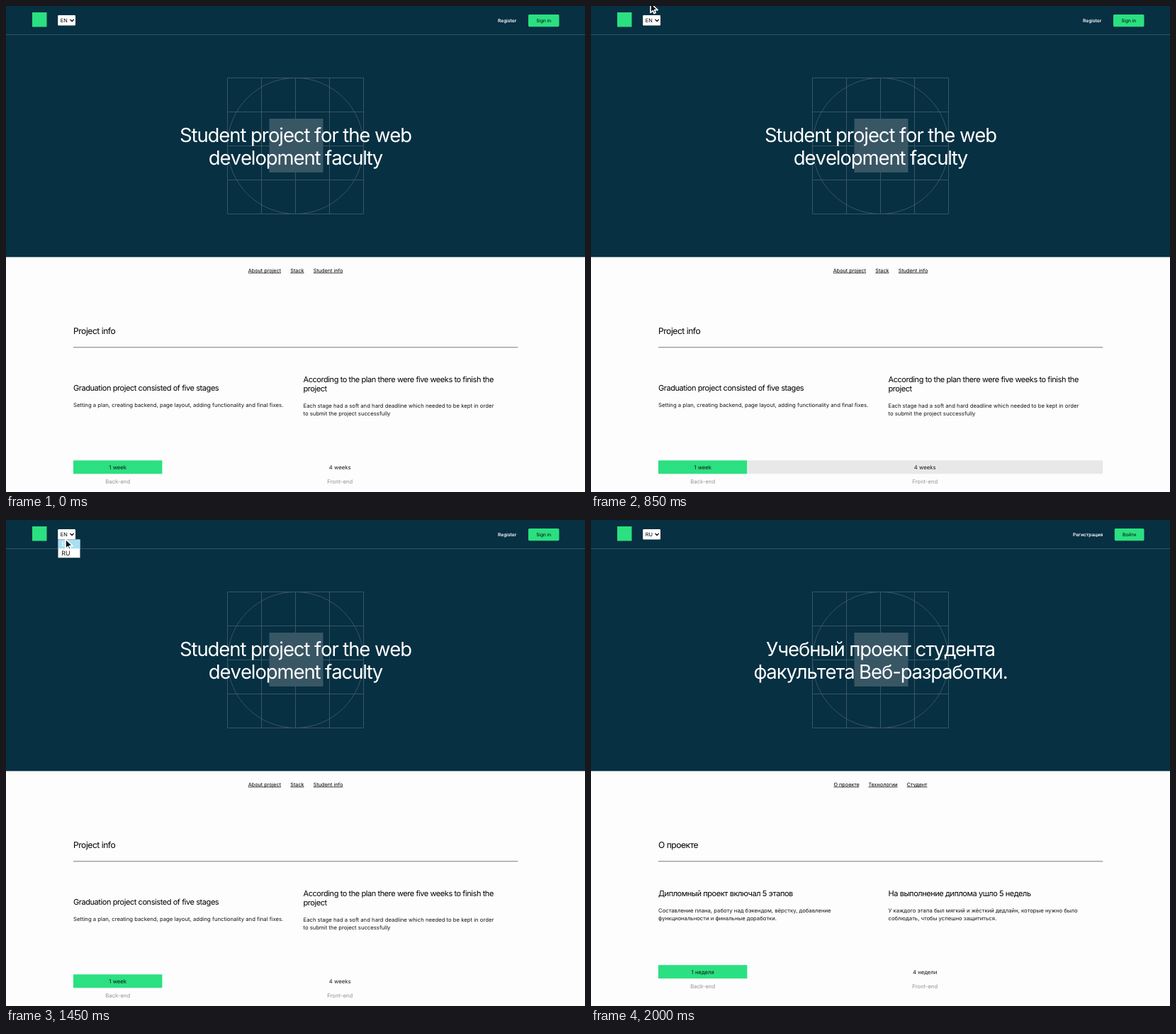
Recreate the animation shown at these times as an HTML page. Size 817x686 px, loop 3.9 s.

```html
<!DOCTYPE html>
<html lang="en">
<head>
<meta charset="utf-8">
<title>Language switch</title>
<style>
  html, body { margin: 0; width: 100%; height: 100%; overflow: hidden; background: #fdfdfd; }
  svg { display: block; width: 817px; height: 686px; }
  text {
    font-family: Inter, "Open Sans", sans-serif;
    font-optical-sizing: none;
    text-rendering: geometricPrecision;
    font-size: 7.72px;
    fill: #161616;
  }
  .title { font-size: 27.5px; letter-spacing: -.04em; font-kerning: none; fill: #fff; text-anchor: middle; }
  .section { font-size: 12.1px; letter-spacing: -.04em; fill: #000; }
  .head { font-size: 11px; letter-spacing: -.039em; fill: #000; }
  .nav { font-size: 7.26px; text-anchor: middle; fill: #000; }
  .nav tspan { text-decoration: underline; }
  .register { font-size: 6.6px; font-weight: 600; fill: #fff; text-anchor: end; }
  .sign { font-size: 6.6px; fill: #000; text-anchor: middle; }
  .select { font-size: 7.33px; fill: #000; }
  .option { font-size: 8.9px; }
  .mid { text-anchor: middle; }
  .label { text-anchor: middle; fill: #a6a6a6; stroke: #a6a6a6; stroke-width: .15px; }

  /* One loop is 3900 ms; every change is a hard cut. */
  .en, .ru, .rest, .menu, .mark, .opt-en, .opt-ru, .arrow, .hand, .label {
    animation: 3900ms step-end infinite;
  }
  .en { animation-name: en; }
  .ru { animation-name: ru; }
  .rest { animation-name: rest; }
  .menu { animation-name: menu; }
  .mark { animation-name: mark; }
  .opt-en { animation-name: opt-en; }
  .opt-ru { animation-name: opt-ru; }
  .arrow { animation-name: arrow; }
  .hand { animation-name: hand; }
  .label { animation-name: label; }

  @keyframes en { 0% { visibility: visible } 48.718%, 100% { visibility: hidden } }
  @keyframes ru { 0% { visibility: hidden } 48.718%, 100% { visibility: visible } }
  @keyframes rest {
    0%, 26.923%, 100% { visibility: hidden }
    21.795% { visibility: visible }
  }
  @keyframes label {
    0%, 26.923%, 100% { fill: #a6a6a6; stroke-width: .15px }
    19.231% { fill: #959595; stroke-width: 0 }
  }
  @keyframes menu {
    0%, 48.718%, 100% { visibility: hidden }
    32.051% { visibility: visible }
  }
  @keyframes mark { 0% { transform: none } 39.744%, 100% { transform: translateY(12.6px) } }
  @keyframes opt-en { 0% { fill: #fff } 39.744%, 100% { fill: #161616 } }
  @keyframes opt-ru { 0% { fill: #161616 } 39.744%, 100% { fill: #fff } }
  @keyframes hand {
    0%, 37.179%, 100% { visibility: hidden }
    26.923% { visibility: visible }
  }
  @keyframes arrow {
    0% { visibility: hidden; transform: translate(84px, -30px) }
    19.231% { visibility: visible; transform: translate(84px, -15px) }
    20.513% { visibility: visible; transform: translate(84px, -10px) }
    21.795% { visibility: visible; transform: translate(84px, -4px) }
    23.077% { visibility: visible; transform: translate(84px, 4px) }
    24.359% { visibility: visible; transform: translate(84px, 10px) }
    25.641% { visibility: visible; transform: translate(84px, 16px) }
    26.923% { visibility: hidden; transform: translate(84px, 20px) }
    37.179% { visibility: visible; transform: translate(84px, 27px) }
    38.462% { visibility: visible; transform: translate(84px, 35px) }
    39.744% { visibility: visible; transform: translate(84px, 42px) }
    42.308% { visibility: visible; transform: translate(84px, 48px) }
    48.718% { visibility: visible; transform: translate(84px, 50px) }
    51.282%, 100% { visibility: hidden; transform: translate(84px, 50px) }
  }
</style>
</head>
<body>
<svg viewBox="0 0 817 686">
  <rect width="817" height="686" fill="#fdfdfd"/>
  <rect width="817" height="354.4" fill="#073042"/>
  <rect y="40" width="817" height="1" fill="#355261"/>

  <!-- hero drawing -->
  <rect x="371.5" y="159" width="76" height="76" fill="#395665"/>
  <g fill="none" stroke="#395665">
    <path d="M312.5 101.5h192v192h-192zM360.5 101.5v192M408.5 101.5v192M456.5 101.5v192M312.5 149.5h192M312.5 197.5h192M312.5 245.5h192"/>
    <circle cx="408.5" cy="197.5" r="96"/>
  </g>

  <!-- header -->
  <rect x="37" y="9" width="20.5" height="20.5" fill="#2be080"/>
  <rect x="73.2" y="13" width="24.8" height="14.5" rx="1.2" fill="#fff"/>
  <path d="M90.5 18.9l2.6 2.6 2.6-2.6" fill="none" stroke="#000" stroke-width="1.3"/>

  <rect x="95" y="481.3" width="627.3" height="1" fill="#757b7d"/>

  <g class="en">
    <text class="select" x="76.8" y="22.9">EN</text>
    <text class="register" x="720.4" y="22.8">Register</text>
    <rect x="737" y="12" width="43.5" height="17.2" rx="1.6" fill="#2be080"/>
    <text class="sign" x="758.7" y="22.8">Sign in</text>
    <text class="title" x="408.5" y="191.6">Student project for the web</text>
    <text class="title" x="408.5" y="223.5">development faculty</text>
    <text class="nav" x="408.5" y="375.6"><tspan>About project</tspan><tspan dx="13.2">Stack</tspan><tspan dx="13.2">Student info</tspan></text>
    <text class="section" x="95" y="462.5">Project info</text>
    <text class="head" x="95" y="543.2">Graduation project consisted of five stages</text>
    <text x="95" y="566.3">Setting a plan, creating backend, page layout, adding functionality and final fixes.</text>
    <text class="head" x="419.5" y="531">According to the plan there were five weeks to finish the</text>
    <text class="head" x="419.5" y="544.2">project</text>
    <text x="419.5" y="567.4">Each stage had a soft and hard deadline which needed to be kept in order</text>
    <text x="419.5" y="578.4">to submit the project successfully</text>
    <rect x="95" y="641.4" width="125.4" height="19" fill="#2be080"/>
    <rect class="rest" x="220.4" y="641.4" width="501.8" height="19" fill="#e8e8e8"/>
    <text class="mid" x="157.7" y="653.7">1 week</text>
    <text class="mid" x="471.2" y="653.7">4 weeks</text>
    <text class="label" x="157.7" y="673.6">Back-end</text>
    <text class="label" x="471.2" y="673.6">Front-end</text>
  </g>

  <g class="ru" lang="ru">
    <text class="select" x="76.8" y="22.9">RU</text>
    <text class="register" x="722.3" y="22.8">Регистрация</text>
    <rect x="738.8" y="12" width="41.7" height="17.2" rx="1.6" fill="#2be080"/>
    <text class="sign" x="759.6" y="22.8">Войти</text>
    <text class="title" x="408.5" y="191.6">Учебный проект студента</text>
    <text class="title" x="408.5" y="223.5">факультета Веб-разработки.</text>
    <text class="nav" x="408.5" y="375.6"><tspan>О проекте</tspan><tspan dx="13.2">Технологии</tspan><tspan dx="13.2">Студент</tspan></text>
    <text class="section" x="95" y="462.5">О проекте</text>
    <text class="head" x="95" y="531">Дипломный проект включал 5 этапов</text>
    <text x="95" y="554.1">Составление плана, работу над бэкендом, вёрстку, добавление</text>
    <text x="95" y="565.1">функциональности и финальные доработки.</text>
    <text class="head" x="419.5" y="531">На выполнение диплома ушло 5 недель</text>
    <text x="419.5" y="554.1">У каждого этапа был мягкий и жёсткий дедлайн, которые нужно было</text>
    <text x="419.5" y="565.1">соблюдать, чтобы успешно защититься.</text>
    <rect x="95" y="628.2" width="125.4" height="19" fill="#2be080"/>
    <text class="mid" x="157.7" y="640.5">1 неделя</text>
    <text class="mid" x="471.2" y="640.5">4 недели</text>
    <text class="label" x="157.7" y="660.6">Back-end</text>
    <text class="label" x="471.2" y="660.6">Front-end</text>
  </g>

  <g class="menu">
    <rect x="73.3" y="27.3" width="31.4" height="26" fill="#fff" stroke="#52636c" stroke-width=".5"/>
    <rect class="mark" x="73.8" y="27.7" width="30.5" height="12.6" fill="#a9def3"/>
    <text class="option opt-en" x="78.3" y="37.2">EN</text>
    <text class="option opt-ru" x="78.3" y="49.6">RU</text>
  </g>

  <!-- pointers -->
  <path class="arrow" d="M0 0V13.5L3.4 10.6 5 14.6 7.2 13.6 5.7 9.6H10.2Z" fill="#06131b" stroke="#fff" stroke-width="1.6" stroke-linejoin="round"/>
  <path class="hand" d="M83.1 28.5V21.3q0-1.2 1-1.2t1 1.2V25.3q1.3-.6 1.8.5 1.3-.4 1.6.6 1.6-.3 1.6 1.2V30.3q0 2.4-1.5 4.5H84.2q-.5-1.7-2.9-4.3-.9-1.5.3-2.2.8-.3 1.5.9z" fill="#fff" stroke="#0b1c26" stroke-width=".8" stroke-linejoin="round"/>
</svg>
</body>
</html>
```
